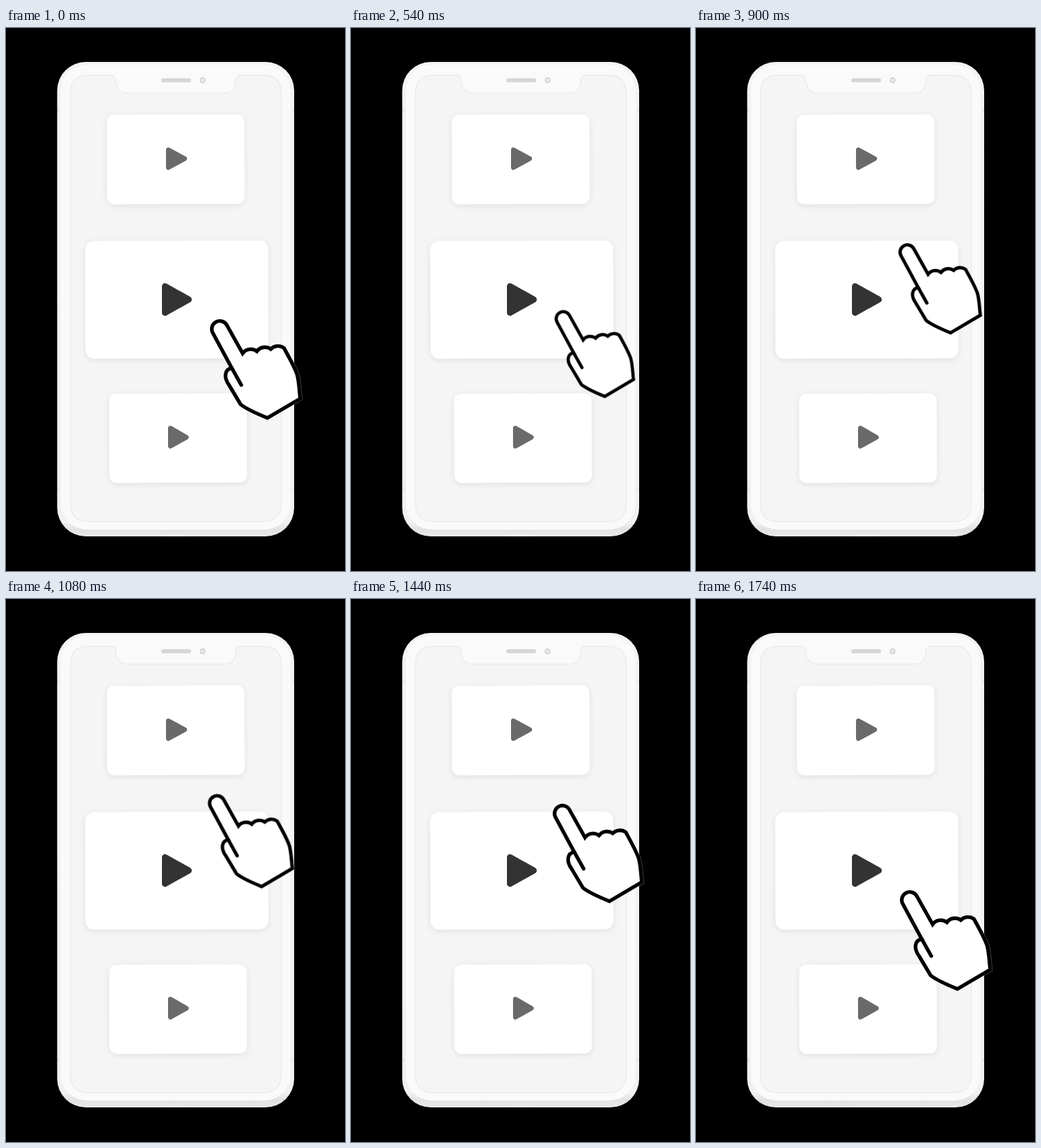
These frames come from a looping animation (500x800 px, 1.8 s). An HTML page:

```html
<!DOCTYPE html>
<html lang="en">
<head>
<meta charset="utf-8">
<title>Tap and scroll</title>
<style>
  html, body { margin: 0; width: 100%; height: 100%; overflow: hidden; background: #000; }
  svg { display: block; width: 500px; height: 800px; }
  .card { fill: #fff; filter: drop-shadow(0 2px 4px rgba(0, 0, 0, .09)); }
  .play { fill: #6a6a6a; stroke: #6a6a6a; stroke-width: 7; stroke-linejoin: round; filter: blur(.5px); }
  .play.main { fill: #333; stroke: #333; stroke-width: 9; }
  .hand { fill: #fff; stroke: #000; stroke-width: 5.4; stroke-miterlimit: 8; stroke-linecap: round; }
  .halo { fill: none; stroke: rgba(255, 255, 255, .3); stroke-width: 7; }
  #size { filter: blur(.4px); }
</style>
</head>
<body>
<svg viewBox="0 0 500 800">
  <defs>
    <linearGradient id="body" x1="0" y1="0" x2="0" y2="1">
      <stop offset="0" stop-color="#f3f3f3"/>
      <stop offset=".97" stop-color="#f1f1f1"/>
      <stop offset=".985" stop-color="#e2e2e2"/>
      <stop offset="1" stop-color="#e9e9e9"/>
    </linearGradient>
    <!-- origin at the fingertip -->
    <path id="outline" d="M17 56L-11 4.2A11.8 11.8 0 0 1 9.7 -7.3L33 34.3
      A15 15 0 0 1 54 31.3A15 15 0 0 1 74.5 28A15 15 0 0 1 94 26.5
      C102 41 110 55 113.5 66C116.5 78 116.5 90 118 101L69.5 129.5
      Q40 117.5 30 109.5L13 81C5 70 6 58 17 56Z"/>
  </defs>

  <!-- phone -->
  <rect x="75.5" y="50" width="349.5" height="699" rx="42" fill="url(#body)"/>
  <rect x="81" y="54" width="338.5" height="685" rx="38" fill="#fafafa"/>
  <path d="M77 118v5M423.5 118v5M77 676v5M423.5 676v5" stroke="#e4e4e4" stroke-width="2"/>
  <path d="M231 747.5h38" stroke="#f6f6f6" stroke-width="2"/>
  <path d="M122 69.5H155Q161 69.5 162 77Q163 96 180 96H322Q338 96 339 77Q340 69.5 346 69.5H379
           Q406 69.5 406 97V700Q406 727.5 379 727.5H122Q95 727.5 95 700V97Q95 69.5 122 69.5Z"
        fill="#f5f5f5" stroke="#ebebeb" stroke-width="1.5"/>
  <rect x="229" y="74" width="44" height="6" rx="3" fill="#d6d6d6"/>
  <circle cx="290" cy="77" r="4.5" fill="#d8d8d8"/>
  <circle cx="290" cy="77" r="2" fill="#efefef"/>

  <!-- videos -->
  <g transform="rotate(-.2 251 400)">
    <rect class="card" x="149.5" y="127.5" width="203" height="132" rx="11"/>
    <rect class="card" x="117" y="313.5" width="270" height="173.5" rx="13"/>
    <rect class="card" x="151.5" y="538.5" width="203" height="131.5" rx="11"/>
  </g>
  <path class="play" d="M239.5 179.5L263.5 192.5L239.5 205.5Z"/>
  <path class="play main" d="M234.5 380.5L269.5 400L234.5 419.5Z"/>
  <path class="play" d="M242.5 589.5L266 603L242.5 616Z"/>

  <!-- hand -->
  <g id="move"><g id="size">
    <use class="halo" href="#outline"/>
    <use class="hand" href="#outline"/>
    <path class="hand" d="M17 56L31 81"/>
  </g></g>
</svg>
<script>
  const LOOP = 1800, STEP = 60;
  const IN_OUT = 'cubic-bezier(.42, 0, .58, 1)';

  // Each step: [time, transform, easing towards the next step]
  const track = (id, steps) => {
    const frames = steps.map(([time, transform, easing = 'linear']) =>
      ({ offset: time / LOOP, transform, easing }));
    const anim = document.getElementById(id).animate(frames, { duration: LOOP, iterations: Infinity });
    anim.pause();
    return anim;
  };
  const at = (x, y) => `translate(${x}px, ${y}px)`;

  const tracks = [
    track('move', [
      [0, at(316, 445), IN_OUT],
      [240, at(313.7, 442)],
      [360, at(313.7, 442), 'cubic-bezier(.42, 0, .4, 1)'],
      [1320, at(311.8, 291.5), IN_OUT],
      [1740, at(316, 445)],
      [1800, at(316, 445)]
    ]),
    track('size', [
      [0, 'scale(1)', IN_OUT],
      [240, 'scale(.872)'],
      [420, 'scale(.872)', IN_OUT],
      [1740, 'scale(1)'],
      [1800, 'scale(1)']
    ])
  ];

  const start = performance.now();
  const draw = () => {
    const t = (performance.now() - start) % LOOP;
    const held = Math.floor(t / STEP) * STEP;
    for (const anim of tracks) anim.currentTime = held;
    requestAnimationFrame(draw);
  };
  draw();
</script>
</body>
</html>
```
